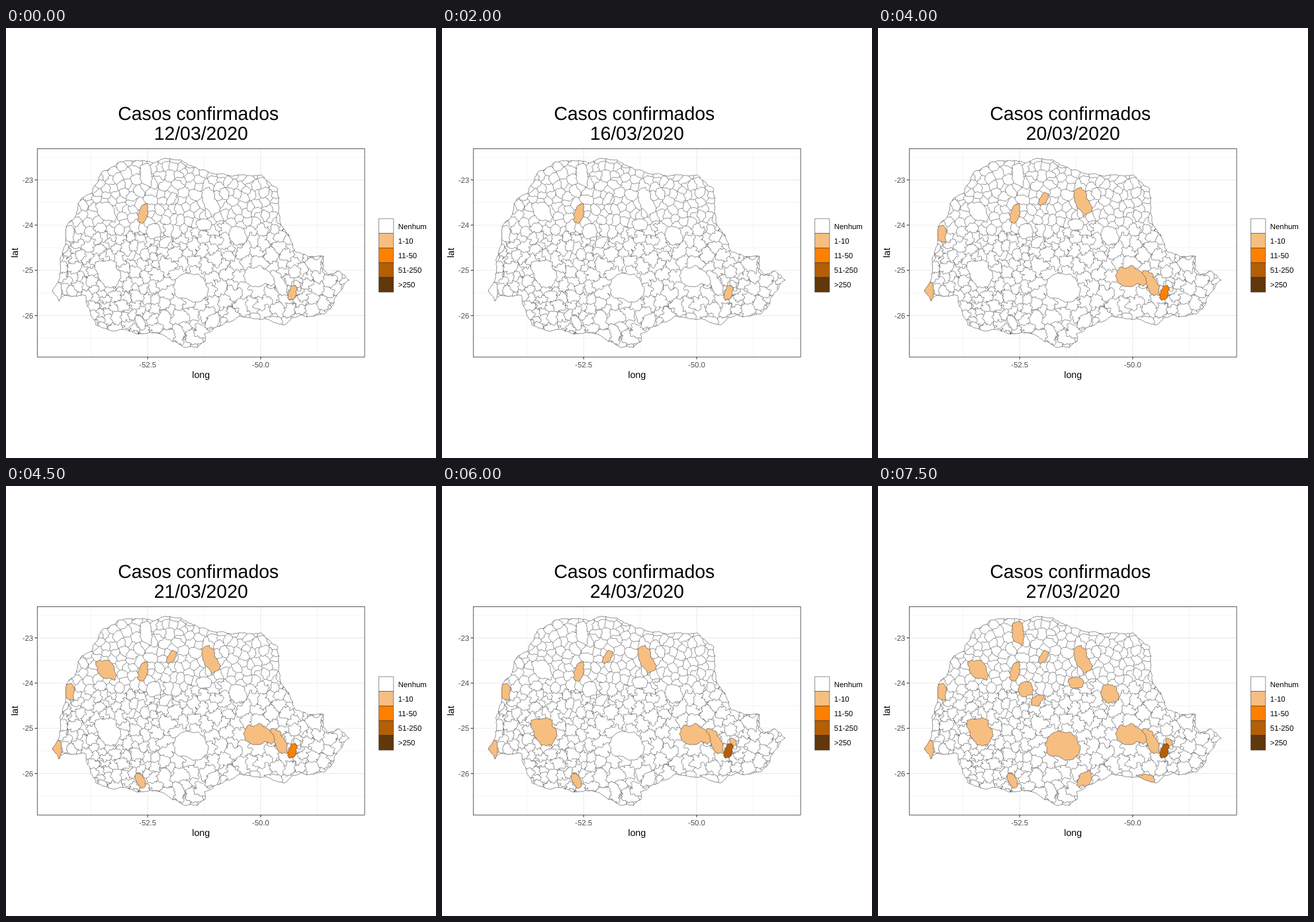
Animation of 650 by 650 pixels, one loop 8000 ms. Source, as an HTML page:

```html
<!DOCTYPE html>
<html lang="pt">
<head>
<meta charset="utf-8">
<title>Casos confirmados</title>
<style>
  html, body { margin: 0; width: 100%; height: 100%; overflow: hidden; background: #fff; }
  svg { display: block; width: 100vw; height: 100vh; font-family: "Liberation Sans", Arial, sans-serif; }
  text { text-rendering: geometricPrecision; }
  .title { font-size: 28.4px; text-anchor: middle; }
  .name { font-size: 14.2px; text-anchor: middle; }
  .label { font-size: 11.4px; }
  .tick { fill: #4d4d4d; }
  .grid { fill: none; stroke: #ebebeb; }
  .axis { fill: none; stroke: #333; stroke-width: 1.1; }
  .frame { fill: none; stroke: #333; stroke-width: .8; }
  .line { stroke: #222; stroke-width: .5; stroke-linejoin: round; }
</style>
</head>
<body>
<svg viewBox="0 0 650 650">
  <defs><clipPath id="inside"><path id="clip"/></clipPath></defs>
  <text class="title" x="290.7" y="138.5">Casos confirmados</text>
  <text class="title" id="date" x="294.7" y="169.2">12/03/2020</text>
  <g id="grid"></g>
  <path id="land" fill="#fff"/>
  <g clip-path="url(#inside)">
    <path id="mesh" class="line" fill="none"/>
    <g id="areas"></g>
  </g>
  <path id="border" class="line" fill="none"/>
  <rect class="frame" x="47.3" y="182.5" width="494.8" height="314.8"/>
  <g id="ticks"></g>
  <text class="name" x="294.7" y="528.8">long</text>
  <text class="name" transform="translate(17.6 339.8) rotate(-90)">lat</text>
  <g id="legend"></g>
</svg>
<script>
const $ = id => document.getElementById(id);
const LEVELS = [
  ['Nenhum', '#fff'], ['1-10', '#f7be81'], ['11-50', '#ff8000'], ['51-250', '#b45f04'], ['>250', '#61380b']
];
const DAY_MS = 500, DAYS = 16;

// key points of the coast and borders; the detail between them is generated
const border = `112,261 131,249 140,226 160,210 180,201 222,204 240,197 285,210 320,221 386,222 411,243
  412,262 428,313 437,338 480,345 479,364 487,373 503,367 519,381 503,400 482,432 445,433 420,449 388,440
  352,436 318,452 300,462 301,474 289,483 255,474 215,461 150,454 136,449 121,410 120,404 88,404 80,413
  70,398 81,372 82,349 90,322 90,305 103,288`.split(/\s+/).map(pair => pair.split(',').map(Number));

let seed = 2020;
function random() {
  seed = (seed + 0x6d2b79f5) | 0;
  let t = Math.imul(seed ^ (seed >>> 15), 1 | seed);
  t = (t + Math.imul(t ^ (t >>> 7), 61 | t)) ^ t;
  return ((t ^ (t >>> 14)) >>> 0) / 4294967296;
}

// irregular boxy patch; lean shifts it sideways as it goes down
function patch(x, y, w, h, lean) {
  const soften = v => Math.sign(v) * Math.abs(v) ** .7;
  return Array.from({ length: 10 }, (_, i) => {
    const angle = i / 10 * 2 * Math.PI, k = .85 + random() * .3;
    const dy = soften(Math.sin(angle)) * h / 2 * k;
    return [x + soften(Math.cos(angle)) * w / 2 * k + lean * dy, y + dy];
  });
}

// a town's place, size and lean, then the level it takes from a given day on
const town = (x, y, w, h, lean, steps) => ({ site: [x, y], points: patch(x, y, w, h, lean), steps });
const towns = [
  town(207, 280, 14, 29, -.25, { 0: 1 }),
  town(412, 384, 20, 38, .45, { 5: 1 }),
  town(309, 262, 21, 42, .3, { 5: 1 }),
  town(251, 258, 13, 19, -.4, { 6: 1 }),
  town(77, 398, 14, 32, 0, { 6: 1 }),
  town(443, 394, 6, 8, 0, { 6: 1, 7: 0 }),
  town(383, 376, 46, 29, .5, { 7: 1 }),
  town(96, 311, 12, 27, .1, { 8: 1 }),
  town(152, 277, 27, 29, .4, { 9: 1, 10: 0, 14: 1 }),
  town(203, 445, 14, 22, .3, { 9: 1 }),
  town(440, 387, 9, 11, .2, { 10: 1 }),
  town(154, 370, 34, 42, .2, { 11: 1 }),
  town(212, 222, 17, 35, .1, { 14: 1 }),
  town(223, 307, 22, 21, 0, { 13: 1 }),
  town(299, 297, 23, 17, 0, { 13: 1 }),
  town(351, 315, 27, 27, .2, { 14: 1 }),
  town(241, 324, 17, 18, -.4, { 15: 1 }),
  town(279, 391, 51, 40, .2, { 15: 1 }),
  town(312, 443, 20, 24, -.3, { 15: 1 }),
  town(405, 442, 24, 14, .9, { 15: 1 }),
  town(433, 400, 12, 20, -.2, { 0: 1, 7: 2, 12: 3 })
];

function add(parent, tag, attrs, text = '') {
  const el = document.createElementNS('http://www.w3.org/2000/svg', tag);
  for (const key in attrs) el.setAttribute(key, attrs[key]);
  el.textContent = text;
  return parent.appendChild(el);
}

// line from p to q, roughened by midpoint displacement
function rough(p, q, amp) {
  const dx = q[0] - p[0], dy = q[1] - p[1];
  if (Math.hypot(dx, dy) < 2.6) return `L${q[0].toFixed(1)} ${q[1].toFixed(1)}`;
  const k = (random() - .5) * amp;
  const m = [(p[0] + q[0]) / 2 - dy * k, (p[1] + q[1]) / 2 + dx * k];
  return rough(p, m, amp) + rough(m, q, amp);
}

function roughLoop(points, amp) {
  return 'M' + points[0] + points.map((p, i) => rough(p, points[(i + 1) % points.length], amp)).join('') + 'Z';
}

function contains(points, [x, y]) {
  let odd = false;
  points.forEach(([ax, ay], i) => {
    const [bx, by] = points[(i + 1) % points.length];
    if ((ay > y) !== (by > y) && x < ax + (y - ay) * (bx - ax) / (by - ay)) odd = !odd;
  });
  return odd;
}

const dist = (a, b) => Math.hypot(a[0] - b[0], a[1] - b[1]);

// towns lie close together in the north and west, wider apart in the south and east
function spacing([x, y]) {
  if (x > 410) return 13;
  if (y < 305) return 9.5;
  if (x < 225) return 10.5;
  return Math.min(16, 10.5 + (y - 305) / 8);
}

function scatter() {
  const sites = towns.map(t => t.site);
  for (let i = 0; i < 6000; i++) {
    const p = [60 + random() * 470, 188 + random() * 305];
    const gap = spacing(p) * (.75 + random() * .5);
    if (sites.every(s => dist(s, p) > gap) && !towns.some(t => contains(t.points, p))) sites.push(p);
  }
  return sites;
}

// keep the part of a cell nearer to a than to b; every corner carries the neighbour behind its edge
function cut(cell, a, b, tag) {
  const out = [];
  const side = p => dist(p, a) ** 2 - dist(p, b) ** 2;
  cell.forEach((p, i) => {
    const q = cell[(i + 1) % cell.length];
    const sp = side(p), sq = side(q);
    if (sp <= 0) out.push(p);
    if ((sp <= 0) !== (sq <= 0)) {
      const k = sp / (sp - sq);
      out.push([p[0] + (q[0] - p[0]) * k, p[1] + (q[1] - p[1]) * k, sp <= 0 ? tag : p[2]]);
    }
  });
  return out;
}

function meshPath() {
  const sites = scatter();
  let d = '';
  sites.forEach((a, i) => {
    let cell = [[40, 170, -1], [550, 170, -1], [550, 510, -1], [40, 510, -1]];
    sites.forEach((b, j) => {
      if (i !== j && dist(a, b) < 90) cell = cut(cell, a, b, j);
    });
    cell.forEach((p, k) => {
      if (p[2] <= i) return;
      const q = cell[(k + 1) % cell.length];
      d += `M${p[0].toFixed(1)} ${p[1].toFixed(1)}` + rough(p, q, p[1] > 305 ? .95 : .45);
    });
  });
  return d;
}

function drawMap() {
  const outline = roughLoop(border, .25);
  for (const id of ['clip', 'land', 'border']) $(id).setAttribute('d', outline);
  $('mesh').setAttribute('d', meshPath());
  for (const t of towns) t.el = add($('areas'), 'path', { class: 'line', d: roughLoop(t.points, .4) });
}

function drawAxes() {
  const latY = lat => 229.6 - (lat + 23) * 68.35;
  const lonX = lon => 214.1 + (lon + 52.5) * 68.35;
  const grid = (d, width) => add($('grid'), 'path', { class: 'grid', d, 'stroke-width': width });
  const mark = (d, attrs, text) => {
    add($('ticks'), 'path', { class: 'axis', d });
    add($('ticks'), 'text', { class: 'label tick', ...attrs }, text);
  };
  for (let lat = -22.5; lat >= -26.5; lat -= .5) {
    const y = latY(lat), major = lat % 1 === 0;
    grid(`M47 ${y}H542`, major ? 1.1 : .55);
    if (major) mark(`M43.5 ${y}H47`, { x: 41.2, y: y + 4.1, 'text-anchor': 'end' }, lat);
  }
  for (let lon = -53.75; lon <= -48.75; lon += 1.25) {
    const x = lonX(lon), major = lon % 2.5 === 0;
    grid(`M${x} 183V497`, major ? 1.1 : .55);
    if (major) mark(`M${x} 497V500.8`, { x, y: 512.6, 'text-anchor': 'middle' }, lon.toFixed(1));
  }
}

function drawLegend() {
  LEVELS.forEach(([label, fill], i) => {
    const y = 288.2 + i * 22.2;
    add($('legend'), 'rect', { class: 'line', x: 563.6, y, width: 22.2, height: 22.2, fill });
    add($('legend'), 'text', { class: 'label', x: 592.8, y: y + 15.3 }, label);
  });
}

function levelOn(day, steps) {
  let level = 0;
  for (const from in steps) if (from <= day) level = steps[from];
  return level;
}

let shown = -1;
function show(day) {
  if (day === shown) return;
  shown = day;
  $('date').textContent = `${12 + day}/03/2020`;
  for (const t of towns) t.el.setAttribute('fill', LEVELS[levelOn(day, t.steps)][1]);
}

drawAxes();
drawMap();
drawLegend();
show(0);

const start = performance.now();
function tick() {
  show(Math.floor((performance.now() - start) / DAY_MS) % DAYS);
  requestAnimationFrame(tick);
}
requestAnimationFrame(tick);
</script>
</body>
</html>
```
